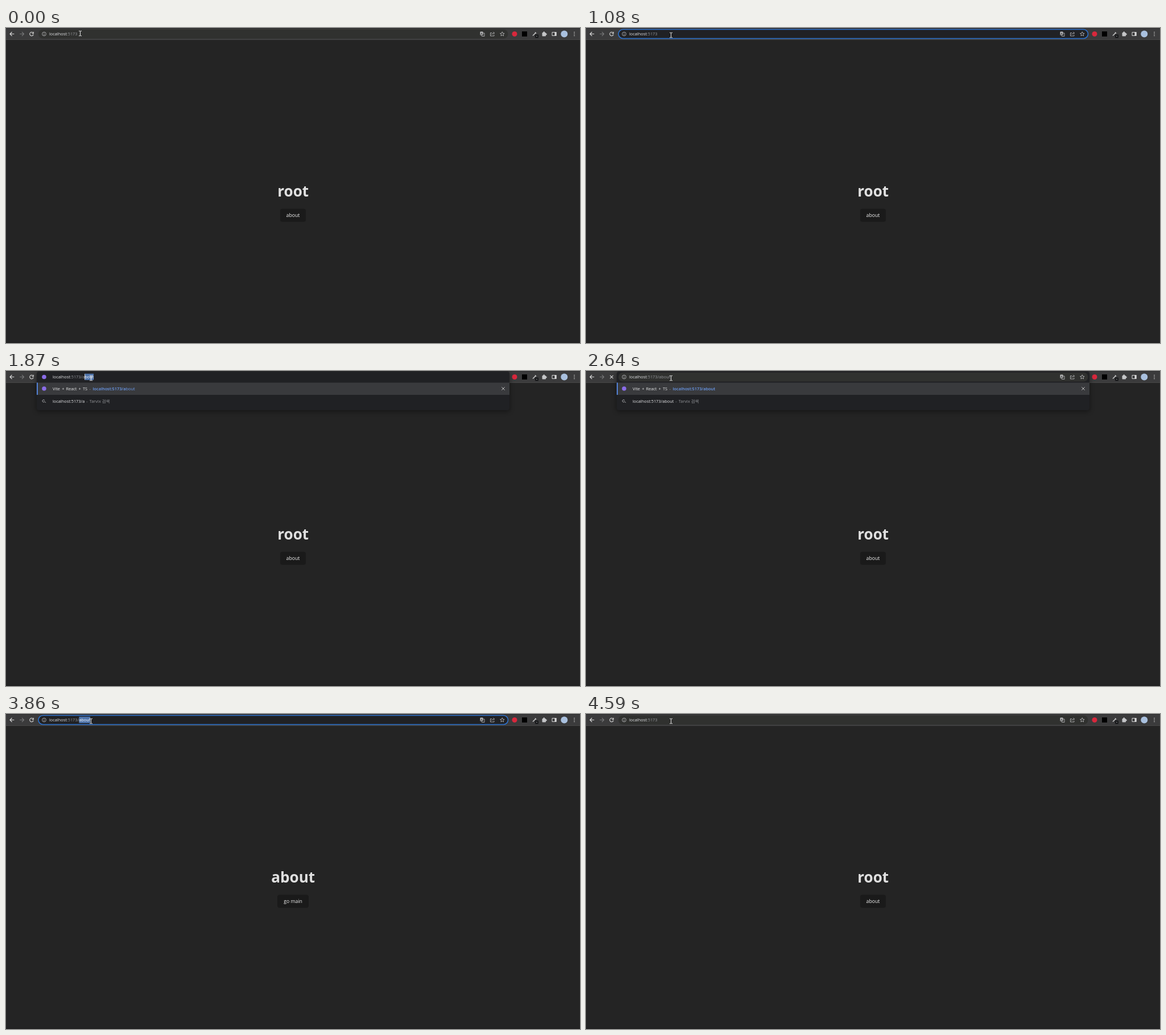
An HTML page with a canvas that plays this animation: 1009 px wide and 555 px high, repeating every 4.97 s.

```html
<!DOCTYPE html>
<html lang="en">
<head>
<meta charset="utf-8">
<title>Routing demo</title>
<style>
  html, body { margin: 0; width: 100%; height: 100%; overflow: hidden; background: #242424; }
  canvas { display: block; }
</style>
</head>
<body>
<canvas id="stage" width="1009" height="555"></canvas>
<script>
const ctx = document.getElementById('stage').getContext('2d');
const LOOP = 4970;
const FONT = '"Open Sans", "Noto Sans CJK KR", "Noto Sans CJK", sans-serif';
const HOST = 'localhost', ROOT = HOST + ':5173', SLASH = ROOT + '/', ABOUT = SLASH + 'about';
const WHITE = '#e4e5e7', GREY = '#94969a', ICON = '#c4c5c7', BLUE = '#6c9cf0', DARK = '#202124';

// Each step patches the state from its time on; sel is a character range of the address.
const steps = [
  [0, { page: 'root', url: ROOT, query: ROOT, mode: 'idle', sel: null, caret: -1,
        drop: false, load: false, click: false, x: 130, y: 9 }],
  [270, { x: 137, y: 10 }],
  [310, { x: 149, y: 12 }],
  [340, { click: true }],
  [400, { mode: 'focus', sel: [0, 14] }],
  [440, { click: false }],
  [570, { click: true }],
  [620, { sel: null, caret: 14 }],
  [670, { click: false }],
  [1080, { caret: -1 }],
  [1560, { mode: 'typing', url: SLASH, query: SLASH, caret: 15 }],
  [1600, { drop: true }],
  ...[1870, 2100, 2210, 2310, 2420].map((time, i) =>
    [time, { url: ABOUT, query: ABOUT.slice(0, 16 + i), sel: [16 + i, 20], caret: 16 + i }]),
  [2640, { mode: 'idle', sel: null, caret: -1, load: true }],
  [2710, { drop: false }],
  [2740, { page: 'about' }],
  [2770, { load: false }],
  [3600, { click: true }],
  [3640, { mode: 'focus', sel: [0, 20] }],
  [3710, { click: false }],
  [3780, { click: true, sel: [15, 20] }],
  [3860, { click: false }],
  [4140, { mode: 'typing', url: SLASH, query: SLASH, sel: null, caret: 15 }],
  [4180, { drop: true }],
  [4440, { mode: 'idle', url: ROOT, caret: -1, load: true }],
  [4510, { drop: false }],
  [4550, { page: 'root' }],
  [4590, { load: false }]
];

function setFont(size, weight = 400) {
  ctx.font = `${weight} ${size}px ${FONT}`;
}

// Draws text and returns its right edge.
function text(string, x, y, color, weight = 400, size = 7.35) {
  setFont(size, weight);
  ctx.fillStyle = color;
  ctx.fillText(string, x, y);
  return x + ctx.measureText(string).width;
}

function rect(x, y, w, h, color) {
  ctx.fillStyle = color;
  ctx.fillRect(x, y, w, h);
}

function round(x, y, w, h, r, color) {
  ctx.beginPath();
  ctx.roundRect(x, y, w, h, r);
  ctx.fillStyle = color;
  ctx.fill();
}

function disc(x, y, r, color) {
  ctx.beginPath();
  ctx.arc(x, y, r, 0, 7);
  ctx.fillStyle = color;
  ctx.fill();
}

function stroke(path, x, y, color = ICON, width = 1) {
  ctx.save();
  ctx.translate(x, y);
  ctx.strokeStyle = color;
  ctx.lineWidth = width;
  ctx.stroke(new Path2D(path));
  ctx.restore();
}

const CROSS = 'M-2.7-2.7L2.7 2.7M2.7-2.7L-2.7 2.7';
const ARROW = 'M3.8 0H-3.2M0-3.5L-3.5 0L0 3.5';
const favicon = y => disc(67, y, 3.8, '#8a6ce8');

function drawPage(page) {
  rect(0, 0, 1009, 555, '#242424');
  rect(0, 553, 1009, 2, '#202020');
  const label = page === 'root' ? 'about' : 'go main';
  const width = page === 'root' ? 45 : 55;
  round(504.5 - width / 2, 318.5, width, 23, 4, '#1a1a1a');
  ctx.textAlign = 'center';
  text(page, 504.7, 296.5, '#e0e0e0', 700, 26.1);
  text(label, 504.5, 333, '#f0f0f0', 400, 8.7);
  ctx.textAlign = 'left';
}

function drawToolbar(load) {
  rect(0, 0, 1009, 20.5, '#3b3b3c');
  rect(0, 0, 1009, 1, '#2c2c2d');
  rect(0, 20, 1009, 1, '#464646');
  stroke(ARROW, 10.5, 10.5, '#dcdcdc', 1.1);
  stroke('M-3.8 0H3.2M0-3.5L3.5 0L0 3.5', 28, 10.5, '#777879', 1.1);
  if (load) stroke(CROSS, 45, 10.5, '#dcdcdc', 1.1);
  else {
    stroke('M2.6-2A3.3 3.3 0 1 0 3.2 1', 45, 10.5, '#dcdcdc', 1.1);
    stroke('M3.3-3.8V-.8H.3', 45, 10.5, '#dcdcdc', 1.1);
  }

  disc(894, 10.5, 4.5, '#d8283c');
  rect(907, 6, 9, 9, '#000');
  stroke('M-3 3L1.5-1.5M1-3L3-1', 929, 10.5, '#d0d0d0', 1.4);
  round(930, 11.5, 6, 6, 1, '#17181a');
  rect(932, 14, 2, 1, '#888');
  round(942.5, 8, 6.5, 6.5, 1, ICON);
  disc(945.7, 7.6, 1.4, ICON);
  disc(949.4, 11, 1.4, ICON);
  stroke('M-3.5-3H3.5V3H-3.5Z', 963.5, 10.5, '#d8d8d8');
  rect(964.5, 7, 3, 7, '#d8d8d8');
  disc(981.3, 10.5, 6, '#a9c0de');
  for (const y of [7.5, 10.5, 13.5]) disc(999, y, 0.8, '#dcdcdc');
}

function drawDropdown(query) {
  const bottom = query === SLASH ? 90 : 69;
  ctx.save();
  ctx.shadowColor = 'rgba(0,0,0,.45)';
  ctx.shadowBlur = 9;
  ctx.shadowOffsetY = 2;
  round(54, 1, 831, bottom - 1, 4, DARK);
  ctx.restore();
  rect(54, 20.5, 831, 21.5, '#393a3d');
  rect(54, 20.5, 1.8, 21.5, '#568bea');
  stroke(CROSS, 874, 31, '#d0d0d0', 0.9);

  const pageRow = (y, bold, rest) => {
    favicon(y);
    let x = 82;
    for (const word of 'Vite + React + TS'.split(' ')) x = text(word, x, y + 2.6, WHITE) + 3.2;
    text('-', 146.5, y + 2.6, GREY);
    text(rest, text(bold, 152.5, y + 2.6, BLUE, 600), y + 2.6, BLUE);
  };
  if (query === SLASH) {
    pageRow(31, ROOT, '');
    pageRow(75, SLASH, 'about');
  } else pageRow(31, query, ABOUT.slice(query.length));

  stroke('M.9-.9A2 2 0 1 0 .8 .7L3 2.9', 67, 53, '#b0b1b4');
  const end = text(query, 82, 55.6, WHITE);
  text('-', end + 3, 55.6, GREY);
  text('Tarvix 검색', end + 8.5, 55.6, GREY);
}

function drawAddress({ mode, url, sel, caret, drop }) {
  const typing = mode === 'typing';
  if (!(typing && drop)) {
    round(57, 2.5, 825.5, 16, 8, mode === 'idle' ? '#30312f' : DARK);
    if (mode === 'focus') {
      ctx.strokeStyle = '#2c72cf';
      ctx.lineWidth = 1.6;
      ctx.stroke();
    }
  }
  if (typing) favicon(10.5);
  else {
    stroke('M3.4 0A3.4 3.4 0 1 1 -3.4 0A3.4 3.4 0 1 1 3.4 0M0-.5V2M0-2V-1.1', 67, 10.5, ICON, 0.8);
    round(833.5, 6.5, 5, 6, 0.5, ICON);
    stroke('M1.5-1.5H4V4H-.5L-1.5 2', 837, 10.5, ICON, 0.8);
    text('A', 834.2, 11.6, '#3b3b3c', 700, 5);
    stroke('M-1-2H-3.5V3.5H3V1.5M-1.5 1.5C-1-1 1-1.5 3-1.5M1.5-3.7L3.7-1.5L1.5.5', 855, 10.5, ICON, 0.8);
    let star = '';
    for (let i = 0; i < 10; i++) {
      const r = i % 2 ? 1.8 : 4, a = i * Math.PI / 5;
      star += `${i ? 'L' : 'M'}${r * Math.sin(a)} ${-r * Math.cos(a)}`;
    }
    stroke(star + 'Z', 872.3, 10.7, ICON, 0.8);
  }

  const left = typing ? 82 : 76, base = 13.1;
  setFont(7.35);
  const at = n => left + ctx.measureText(url.slice(0, n)).width;
  const drawUrl = (host, rest) => text(url.slice(9), text(HOST, left, base, host), base, rest);
  drawUrl(WHITE, GREY);
  if (sel && sel[0] < sel[1]) {
    const x = at(sel[0]), w = at(sel[1]) - x;
    ctx.save();
    ctx.beginPath();
    ctx.rect(x, 4.5, w, 11.5);
    ctx.clip();
    rect(x, 4.5, w, 11.5, '#4f74ab');
    drawUrl('#fff', '#fff');
    ctx.restore();
  }
  setFont(7.35);
  if (caret >= 0) rect(Math.round(at(caret)), 5, 0.8, 10.5, '#d8d8d8');
}

function drawPointer({ x, y, click }) {
  if (click) disc(x, y, 6.5, 'rgba(205,198,28,.82)');
  stroke('M-2.5-4H-.6L0-3.4L.6-4H2.5M0-3.4V3.9M-2.5 4.5H-.6L0 3.9L.6 4.5H2.5',
    x + 0.5, y + 0.3, click ? '#eee98a' : '#e6e6e6', 1);
}

function render(now) {
  const time = now % LOOP;
  const state = Object.assign({}, ...steps.filter(([start]) => start <= time).map(([, patch]) => patch));
  drawPage(state.page);
  drawToolbar(state.load);
  if (state.drop) drawDropdown(state.query);
  drawAddress(state);
  drawPointer(state);
  requestAnimationFrame(render);
}
requestAnimationFrame(render);
</script>
</body>
</html>
```
